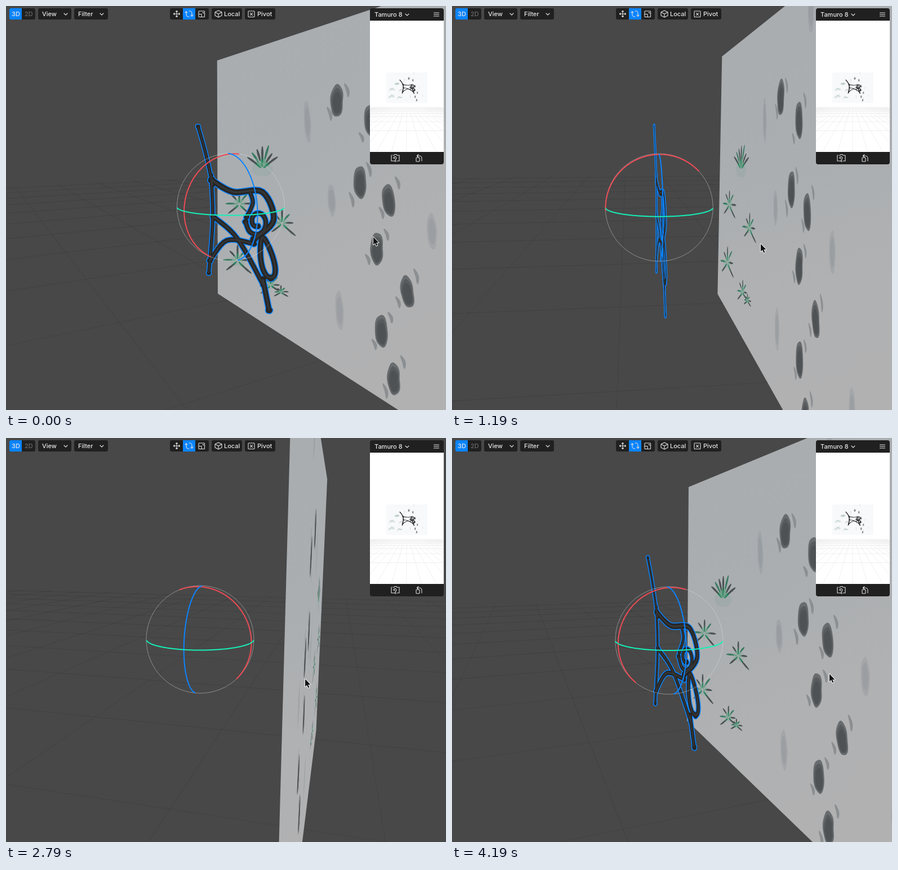
Recreate the animation shown at these times as an HTML page with a canvas. Size 781 by 717 pixels, loop 4290 ms.

```html
<!DOCTYPE html>
<html lang="en">
<head>
<meta charset="utf-8">
<title>3D viewport orbit</title>
<style>
  html, body { margin: 0; width: 781px; height: 717px; overflow: hidden; background: #484848; }
  canvas, svg { position: absolute; left: 0; top: 0; }
  text { font: 500 11px Inter, sans-serif; fill: #e6e6e6; dominant-baseline: central; }
  .box { fill: #202020; }
  .on { fill: #0a84ff; }
  .icon { fill: none; stroke: #e0e0e0; stroke-width: 1.1; stroke-linecap: round; stroke-linejoin: round; }
</style>
</head>
<body>
<canvas id="stage" width="781" height="717"></canvas>
<svg width="781" height="717">
  <rect class="box" x="6" y="4" width="46" height="20" rx="3"/>
  <path class="on" d="M28 4H9a3 3 0 0 0-3 3v14a3 3 0 0 0 3 3h19z"/>
  <text x="10" y="14">3D</text><text x="33" y="14" style="fill:#6a6a6a">2D</text>
  <rect class="box" x="57" y="4" width="59" height="20" rx="3"/><text x="64" y="14">View</text>
  <rect class="box" x="121" y="4" width="60" height="20" rx="3"/><text x="128" y="14">Filter</text>
  <rect class="box" x="291" y="4" width="69" height="20" rx="3"/>
  <rect class="on" x="314" y="4" width="22" height="20"/>
  <rect class="box" x="365" y="4" width="54" height="20" rx="3"/><text x="387" y="14">Local</text>
  <rect class="box" x="424" y="4" width="54" height="20" rx="3"/><text x="446" y="14">Pivot</text>
  <path class="box" d="M646 26V8a4 4 0 0 1 4-4h123a4 4 0 0 1 4 4v18zM646 259h131v18a4 4 0 0 1-4 4H650a4 4 0 0 1-4-4z"/>
  <text x="654" y="15">Tamuro 8</text>
  <g class="icon">
    <path d="M103 13l3 3 3-3M167 13l3 3 3-3M709 14l3 3 3-3"/>
    <path d="M303 8.500v11M297.500 14h11M301.500 10l1.500-1.500 1.500 1.500M301.500 18l1.500 1.500 1.500-1.500M299 12.500l-1.500 1.500 1.500 1.500M307 12.500l1.500 1.500-1.500 1.500"/>
    <path d="M320 10v5a4 4 0 0 0 4 4h1M330 18v-5a4 4 0 0 0-4-4h-1M318 12l2-2.500 2 2.500M328 16l2 2.500 2-2.500"/>
    <rect x="342" y="9" width="10.500" height="10.500" rx="1"/><path d="M342 14.500h5v5M349 11.500h1.500v1.500"/>
    <path d="M377 8l6 3v6l-6 3-6-3v-6zM371 11l6 3 6-3M377 14v6"/>
    <rect x="430" y="9" width="11" height="10.500" rx="1"/><path d="M433.500 12.300l4 4M437.500 12.300l-4 4"/>
    <path d="M759.500 12h9M759.500 15h9M759.500 18h9"/>
    <path d="M687 265h2l1-1.500h3l1 1.500h4v10h-4M692 276.500l-2-1.500 2-1.500M690 275h-6v-10h1"/>
    <path d="M688.500 270.500a2.300 2.300 0 1 1 2 1.500M688 269l.6 1.600 1.500-.5"/>
    <rect x="728" y="269" width="6" height="7" rx="1"/><path d="M738 275v-5a4 4 0 0 0-4-4h-4M732 263.500l-2.500 2.500 2.500 2.500"/>
  </g>
</svg>
<script>
const ctx = document.getElementById('stage').getContext('2d');
const W = 781, H = 717, CX = 390, CY = 358, FOCAL = 775, DIST = 775;
const LOOP = 4290, STEP = 100;
const WALL = { n: 154, far: -319, near: 447, top: -312, bottom: 288 };
const CAT_N = -27, FLOOR = 330, CELL = 390, REACH = 4000;
const BLUE = '#0a84ff';

// The drag: step, yaw in degrees, horizon height above centre, pointer x
const DRAG = [
  [0, -29.2, 121, 652],
  [8, -11.2, 128, 586],
  [12, -5.8, 133, 548],
  [18, 15.9, 154, 510],
  [28, 14.2, 158, 531],
  [34, -1.95, 151, 587],
  [42, -19.1, 146, 670]
];

// Cubic Hermite through one column of the drag
function keyed(col, step) {
  const last = DRAG.length - 1;
  const rate = i => (DRAG[i + 1][col] - DRAG[i][col]) / (DRAG[i + 1][0] - DRAG[i][0]);
  const slope = i => {
    if (i === 0) return rate(0);
    if (i === last) return rate(last - 1);
    const before = DRAG[i][0] - DRAG[i - 1][0], after = DRAG[i + 1][0] - DRAG[i][0];
    return (rate(i - 1) * after + rate(i) * before) / (before + after);
  };
  let i = 0;
  while (i < last - 1 && step >= DRAG[i + 1][0]) i++;
  const a = DRAG[i], b = DRAG[i + 1], span = b[0] - a[0], u = (step - a[0]) / span, v = 1 - u;
  return a[col] * v * v * (1 + 2 * u) + b[col] * u * u * (3 - 2 * u)
    + span * u * v * (slope(i) * v - slope(i + 1) * u);
}

function cameraAt(yaw, pitch) {
  return { yaw, pitch, sin: Math.sin(yaw), cos: Math.cos(yaw), sp: Math.sin(pitch), cp: Math.cos(pitch) };
}
const cameraOf = step => cameraAt(keyed(1, step) * Math.PI / 180, Math.atan(keyed(2, step) / FOCAL));

// World axes: s along the wall, n across it, y down
function turn(cam, [s, n, y]) {
  const x = n * cam.cos - s * cam.sin, z = -s * cam.cos - n * cam.sin;
  return [x, y * cam.cp - z * cam.sp, z * cam.cp + y * cam.sp];
}
function project(cam, point) {
  const [x, y, z] = turn(cam, point), k = FOCAL / (DIST + z);
  return [CX + x * k, CY + y * k];
}

// Screen position in the opening view -> point on the plane n
const opening = cameraOf(0);
function lift([px, py], n) {
  const { sin, cos, sp, cp } = opening, a = (px - CX) / FOCAL, b = (py - CY) / FOCAL;
  const t = (n - DIST * cp * sin) / (a * cos + (b * sp - cp) * sin);
  const z = (t - DIST) * cp - b * t * sp;
  return [-a * t * sin - z * cos, n, b * t * cp + (t - DIST) * sp];
}

let seed = 7;
const random = (from = 0, to = 1) => from + (to - from) * (seed = seed * 16807 % 2147483647) / 2147483647;
const times = (count, make) => Array.from({ length: count }, (_, i) => make(i));

// Catmull-Rom through points
function curve(p, steps = 7) {
  const at = i => p[Math.max(0, Math.min(p.length - 1, i))];
  const out = [];
  for (let i = 0; i < p.length - 1; i++)
    for (let t = 0; t < 0.999; t += 1 / steps)
      out.push([0, 1].map(c => {
        const [a, b, d, e] = [at(i - 1)[c], at(i)[c], at(i + 1)[c], at(i + 2)[c]];
        return b + t / 2 * (d - a + t * (2 * a - 5 * b + 4 * d - e + t * (3 * b - a - 3 * d + e)));
      }));
  return [...out, at(p.length)];
}
function ribbon(points, width, taper = false) {
  const mid = curve(points), left = [], right = [];
  mid.forEach(([x, y], i) => {
    const a = mid[Math.max(i - 1, 0)], b = mid[Math.min(i + 1, mid.length - 1)];
    const dx = b[0] - a[0], dy = b[1] - a[1], len = Math.hypot(dx, dy) || 1;
    const r = width / 2 * (taper ? Math.sin(Math.PI * (0.08 + 0.88 * i / mid.length)) : 1);
    left.push([x - dy / len * r, y + dx / len * r]);
    right.unshift([x + dy / len * r, y - dx / len * r]);
  });
  return [...left, ...right];
}
function blob(x, y, rx, ry, tilt = 0, dent = 0) {
  return times(32, i => {
    const a = i * Math.PI / 16, r = 1 - dent * Math.exp(-6 * (1 - Math.cos(a))) + 0.03 * Math.sin(5 * a + x);
    const u = rx * r * Math.cos(a), v = ry * r * Math.sin(a);
    return [x + u * Math.cos(tilt) - v * Math.sin(tilt), y + u * Math.sin(tilt) + v * Math.cos(tilt)];
  });
}

const marks = [];
const paint = (outline, color) => marks.push({ color, points: outline.map(p => lift(p, WALL.n)) });

function wash(x, y) {
  const rx = random(6, 10), ry = random(26, 38);
  for (const k of [1, 0.7]) paint(blob(x, y, rx * k, ry * k, -0.06), 'rgba(125,130,135,.22)');
}
[[535, 205], [578, 345], [756, 400], [592, 540], [676, 38], [822, 625]].forEach(p => wash(...p));

function pawPrint(x, y) {
  const tilt = random(-0.22, 0.08);
  for (const side of [-1, 1]) {
    const sx = x + side * random(13, 18), sy = y - side * random(18, 32), len = random(8, 14);
    paint(ribbon([[sx - 4, sy - len], [sx + 2, sy], [sx + 3, sy + len]], 6, true), '#8b8f92');
  }
  ['#686c6e', '#575b5d', '#4e5254'].forEach((color, i) =>
    paint(blob(x, y + i * 2, 12.5 - i * 2.2, 29 - i * 5, tilt, 0.2), color));
}
[[588, 168], [648, 204], [629, 313], [680, 345], [659, 431], [713, 507], [667, 577], [689, 662]]
  .forEach(p => pawPrint(...p));

function tuft(x, y, size, spread) {
  const count = 7;
  paint(blob(x, y, size * 0.45, size * 0.3), 'rgba(90,150,120,.12)');
  for (let i = 0; i < count; i++) {
    const a = spread * (2 * i / (count - 1) - 1), len = size * random(0.7, 1.1), bend = a * 3;
    const along = k => [x + Math.sin(a) * 0.7 * k * len + bend * k * k, y - Math.cos(a) * k * len - 3 * k * (1 - k)];
    const blade = (from, to) => ribbon([along(from), along((from + to) / 2), along(to)], 2 + size / 22, true);
    paint(blade(0.1, 0.65), i % 3 ? '#6fa18a' : '#2f8560');
    paint(blade(0.4, 1), i % 3 === 1 ? '#3b7a62' : '#4a5252');
  }
}
tuft(455, 290, 42, 1);
[[414, 352, 30], [490, 386, 30], [411, 452, 32], [470, 496, 20], [488, 508, 13]]
  .forEach(([x, y, size]) => tuft(x, y, size, 2.3));

// Wrought-iron cat: bar width and the points it runs through
const bars = [
  [6, [341, 214], [354, 260], [367, 318]],
  [6, [364, 300], [367, 380], [360, 474]],
  [10, [365, 309], [403, 330], [455, 330], [475, 380], [440, 414]],
  [8, [368, 374], [410, 412], [457, 495]],
  [8, [362, 452], [392, 416], [440, 422]],
  [9, [456, 485], [467, 540]],
  [7, [433, 330], [438, 350], [427, 375]],
  [8, ...times(11, i => {
    const a = Math.PI - i * 0.8, r = 26 - i * 1.8;
    return [446 + 0.8 * r * Math.cos(a), 383 + r * Math.sin(a)];
  })],
  [9, ...times(13, i => {
    const a = i * Math.PI / 6, v = 36 * Math.cos(a), u = (11 + v / 9) * Math.sin(a);
    return [463 + u + v * 0.2, 447 + v];
  })]
];
const onCat = outline => outline.map(p => lift(p, CAT_N));
const iron = bars.flatMap(([w, ...line]) => [
  ribbon(line, w), ...[line[0], line[line.length - 1]].map(([x, y]) => blob(x, y, w * 0.65, w * 0.6))
]).map(onCat);
const shine = bars.map(([w, ...line]) => onCat(ribbon(line, w * 0.35)));

function trace(points) {
  ctx.beginPath();
  points.forEach(([x, y]) => ctx.lineTo(x, y));
}
function fillShape(points, color) {
  trace(points);
  ctx.closePath();
  ctx.fillStyle = color;
  ctx.fill();
}
function strokeLine(points, color, width) {
  trace(points);
  ctx.strokeStyle = color;
  ctx.lineWidth = width;
  ctx.stroke();
}

function drawFloor(cam) {
  const depth = p => DIST + turn(cam, p)[2];
  const segment = (a, b) => {
    let da = depth(a), db = depth(b);
    if (da < db) [a, b, da, db] = [b, a, db, da];
    if (da < 40) return;
    if (db < 40) b = b.map((v, i) => v + (a[i] - v) * (40 - db) / (da - db));
    strokeLine([project(cam, a), project(cam, b)], 'rgba(0,0,0,.1)', 1);
  };
  for (let i = -10; i <= 10; i++) {
    const s = 31 + i * CELL, n = -102 + i * CELL;
    segment([s, -REACH, FLOOR], [s, REACH, FLOOR]);
    segment([-REACH, n, FLOOR], [REACH, n, FLOOR]);
  }
}

function drawWall(cam) {
  const { n, far, near, top, bottom } = WALL;
  const corners = [[far, n, top], [near, n, top], [near, n, bottom], [far, n, bottom]].map(p => project(cam, p));
  const shade = ctx.createLinearGradient(...corners[0], ...project(cam, [near * 0.6, n, bottom * 0.8]));
  ['#a9adb0', '#aaaeb1', '#b0b1b2', '#b1b1b2'].forEach((color, i) => shade.addColorStop(i / 3, color));
  fillShape(corners, shade);
  marks.forEach(m => fillShape(m.points.map(p => project(cam, p)), m.color));
}

function drawCat(cam) {
  if (DIST * cam.cp * cam.sin > CAT_N) return; // seen only from its front
  const onScreen = shape => shape.map(p => project(cam, p));
  const shapes = iron.map(onScreen);
  shapes.forEach(s => strokeLine([...s, s[0]], BLUE, 3));
  shapes.forEach(s => fillShape(s, '#252525'));
  shine.forEach(s => fillShape(onScreen(s), '#363636'));
}

function drawGizmo(cam) {
  const [gx, gy] = project(cam, [65, CAT_N, -12]), R = 95.5;
  const local = cameraAt(cam.yaw - Math.atan((gx - CX) / FOCAL), cam.pitch);
  ctx.beginPath();
  ctx.arc(gx, gy, R, 0, 7);
  ctx.strokeStyle = 'rgba(225,225,225,.5)';
  ctx.lineWidth = 0.9;
  ctx.stroke();
  const ring = (color, at) => {
    ctx.beginPath();
    let pen = false;
    for (let i = 0; i <= 240; i++) {
      const a = i * Math.PI / 120, [x, y, z] = turn(local, at(Math.cos(a), Math.sin(a)));
      const front = z < -0.06;
      if (front) ctx[pen ? 'lineTo' : 'moveTo'](gx + R * x, gy + R * y);
      pen = front;
    }
    ctx.strokeStyle = color;
    ctx.lineWidth = 2;
    ctx.stroke();
  };
  ring('#ee4b54', (a, b) => [0, a, b]);
  ring(BLUE, (a, b) => [a, 0, b]);
  ring('#14f0b8', (a, b) => [a, b, 0]);
}

function drawPreview() {
  ctx.save();
  ctx.beginPath();
  ctx.rect(646, 26, 131, 233);
  ctx.clip();
  ctx.fillStyle = '#fff';
  ctx.fill();
  const vx = 711, vy = 166, line = '#e6e6e6';
  for (let i = -14; i <= 14; i++) strokeLine([[vx + i * 4, 180], [vx + i * 27, 260]], line, 0.6);
  for (let k = 0; k < 9; k++) {
    const y = vy + 94 / (1 + 0.7 * k);
    strokeLine([[646, y], [777, y]], line, 0.6);
  }
  ctx.fillStyle = '#f8f9fa';
  ctx.fillRect(675, 118, 73, 54);
  ctx.globalAlpha = 0.4;
  marks.forEach(m => fillShape(m.points.map(([s, , y]) => [705 + s * 0.095, 145 + y * 0.09]), m.color));
  ctx.globalAlpha = 1;
  iron.forEach(c => fillShape(c.map(([s, , y]) => [705 + s * 0.11, 144 + y * 0.09]), '#111'));
  ctx.restore();
}

const arrow = new Path2D('M0 0V13.500L3.100 10.700 5.300 15.600 7.400 14.700 5.300 10H9.600Z');
function drawPointer(x, y) {
  ctx.save();
  ctx.translate(x, y);
  ctx.strokeStyle = '#fff';
  ctx.lineWidth = 1.8;
  ctx.stroke(arrow);
  ctx.fillStyle = '#111';
  ctx.fill(arrow);
  ctx.restore();
}

function render(now) {
  const step = Math.floor((now % LOOP + 10) / STEP), cam = cameraOf(step);
  ctx.lineJoin = 'round';
  ctx.fillStyle = '#484848';
  ctx.fillRect(0, 0, W, H);
  drawFloor(cam);
  drawWall(cam);
  drawCat(cam);
  drawGizmo(cam);
  drawPreview();
  drawPointer(keyed(3, step), 410 + 18 * Math.sin(Math.PI * step / 50));
}

const start = performance.now();
function tick() {
  render(performance.now() - start);
  requestAnimationFrame(tick);
}
tick();
</script>
</body>
</html>
```
